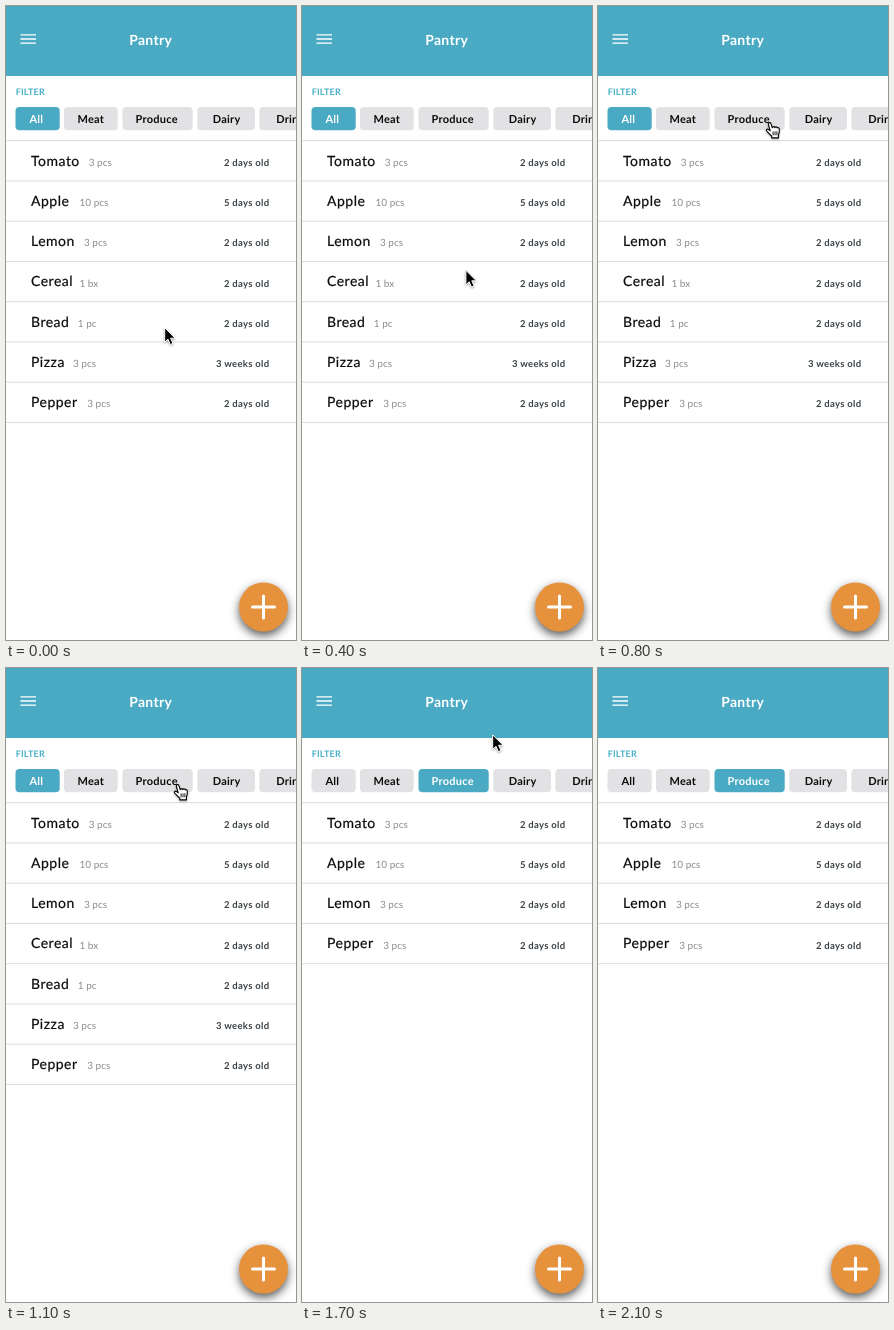
Animation, 290 px wide and 634 px high, one loop 2.2 s. Source, as an HTML page:

```html
<!DOCTYPE html>
<html lang="en">
<head>
<meta charset="utf-8">
<title>Pantry</title>
<style>
  html, body { margin: 0; width: 100%; height: 100%; overflow: hidden; background: #fff; }
  svg { display: block; width: 290px; height: 634px; font-family: Lato, "Open Sans", sans-serif; text-rendering: geometricPrecision; }
  .title { font-size: 14px; font-weight: 700; letter-spacing: .3px; fill: #fff; text-anchor: middle; }
  .label { font-size: 9px; font-weight: 700; letter-spacing: .2px; fill: #4aadc6; }
  .chip rect { fill: #e2e2e4; }
  .chip text { font-size: 11px; font-weight: 700; letter-spacing: .25px; fill: #0c0c0c; text-anchor: middle; }
  .chip.on rect { fill: #4aa9c3; }
  .chip.on text { fill: #fff; }
  .name { font-size: 14px; letter-spacing: .5px; fill: #0a0a0a; stroke: #0a0a0a; stroke-width: .2; }
  .amount { font-size: 10px; fill: #8c8c8c; }
  .age { font-size: 9.5px; font-weight: 700; letter-spacing: .3px; fill: #3a4145; text-anchor: end; }
  .rule { stroke: #dcdcdd; stroke-width: 1; }
  .shadow { filter: drop-shadow(0 4px 5px rgba(0, 0, 0, .65)); }
  #cursor { filter: drop-shadow(0 1px 1px rgba(0, 0, 0, .35)); }
</style>
</head>
<body>
<svg viewBox="0 0 290 634">
  <rect width="290" height="634" fill="#fff"/>
  <rect width="290" height="70" fill="#4aa9c3"/>
  <path d="M14.5 28.9H30M14.5 33H30M14.5 37.1H30" stroke="#fff" stroke-width="1.4"/>
  <text class="title" x="144.7" y="38.5">Pantry</text>
  <text class="label" x="9.7" y="89">FILTER</text>
  <g id="chips"></g>
  <path class="rule" d="M0 134.7H290"/>
  <g id="rows"></g>
  <circle class="shadow" cx="257.5" cy="601" r="24.5" fill="#e6913c"/>
  <path d="M246.5 601H268.5M257.5 590V612" stroke="#fff" stroke-width="3" stroke-linecap="round"/>
  <g id="cursor" stroke-linejoin="round">
    <path id="arrow" fill="#000" stroke="#fff" stroke-width="1"
      d="M0 0V14.6L3.3 11.5L5.6 16.8L8.2 15.7L5.9 10.5H10.4Z"/>
    <g id="hand" stroke="#000" stroke-width="1.1" stroke-linecap="round">
      <path fill="#fff" d="M4.6 9.2L2.8 3C2.3 1 4.6 .3 5.3 2.1L6.7 6.2C6.9 4.9 8.7 4.8 9.2 6.1C9.8 5 11.4 5.2 11.7 6.4C12.5 5.7 13.6 6.2 13.7 7.4C14 10 13.8 11.6 12.8 13.4V16.4H6.2V14.6C4.4 13.2 3.2 11.4 1.3 9.9C0 8.6 1.3 7.2 2.7 7.9Z"/>
      <path fill="none" stroke-width=".9" d="M7.5 10.4V13.4M9.4 10.3V13.4M11.3 10.2V13.3"/>
    </g>
  </g>
</svg>
<script>
const LOOP = 2200, STEP = 100, FILTER_AT = 1200;
const TOP = 134.7, PITCH = 40.25, BASELINE = 25;

// label, left, width, text centre
const chips = [
  ["All", 9.5, 44.2, 30.4],
  ["Meat", 58, 53.7, 84.8],
  ["Produce", 116.5, 70.2, 150.7],
  ["Dairy", 191.3, 57.7, 220.6],
  ["Drinks", 253.3, 66, 287]
];

// name, amount, amount x, age, is produce
const items = [
  ["Tomato", "3 pcs", 82.7, "2 days old", true],
  ["Apple", "10 pcs", 73.5, "5 days old", true],
  ["Lemon", "3 pcs", 78, "2 days old", true],
  ["Cereal", "1 bx", 73.5, "2 days old", false],
  ["Bread", "1 pc", 71.8, "2 days old", false],
  ["Pizza", "3 pcs", 67, "3 weeks old", false],
  ["Pepper", "3 pcs", 81.2, "2 days old", true]
];

// start time, x, y, shape
const moves = [
  [0, 158.7, 321.7, "arrow"],
  [100, 158.8, 320, "arrow"],
  [200, 159.5, 311, "arrow"],
  [300, 161, 294, "arrow"],
  [400, 163.9, 264.3, "arrow"],
  [500, 166.5, 193, "arrow"],
  [600, 168.9, 130.8, "arrow"],
  [700, 167.6, 118, "hand"],
  [800, 167.6, 115.5, "hand"],
  [1200, 171.7, 113.8, "arrow"],
  [1700, 190.7, 66.8, "arrow"],
  [1800, 0, 0, ""]
];

const byId = id => document.getElementById(id);

function add(parent, tag, attrs, text = "") {
  const node = document.createElementNS("http://www.w3.org/2000/svg", tag);
  for (const key in attrs) node.setAttribute(key, attrs[key]);
  node.textContent = text;
  return parent.appendChild(node);
}

const chipNodes = chips.map(([label, x, width, centre]) => {
  const chip = add(byId("chips"), "g", { class: "chip" });
  add(chip, "rect", { x, y: 101, width, height: 23.3, rx: 4 });
  add(chip, "text", { x: centre, y: 117 }, label);
  return chip;
});

const rowNodes = items.map(([name, amount, amountX, age]) => {
  const row = add(byId("rows"), "g", {});
  add(row, "text", { class: "name", x: 25, y: BASELINE }, name);
  add(row, "text", { class: "amount", x: amountX, y: BASELINE + .3 }, amount);
  add(row, "text", { class: "age", x: 263.4, y: BASELINE + .3 }, age);
  add(row, "path", { class: "rule", d: `M0 ${PITCH}H290` });
  return row;
});

function render(time) {
  const filtered = time >= FILTER_AT;
  const active = filtered ? "Produce" : "All";
  chipNodes.forEach((chip, i) => chip.classList.toggle("on", chips[i][0] === active));

  let slot = 0;
  rowNodes.forEach((row, i) => {
    const shown = !filtered || items[i][4];
    row.style.display = shown ? "" : "none";
    if (shown) row.setAttribute("transform", `translate(0 ${TOP + PITCH * slot++})`);
  });

  const [, x, y, shape] = moves.findLast(move => move[0] <= time);
  byId("cursor").setAttribute("transform", `translate(${x} ${y})`);
  for (const id of ["arrow", "hand"]) byId(id).style.display = id === shape ? "" : "none";
}

let lastStep = -1;
const start = performance.now();
function tick() {
  const step = Math.floor(((performance.now() - start) % LOOP) / STEP);
  if (step !== lastStep) render(step * STEP);
  lastStep = step;
  requestAnimationFrame(tick);
}
tick();
</script>
</body>
</html>
```
